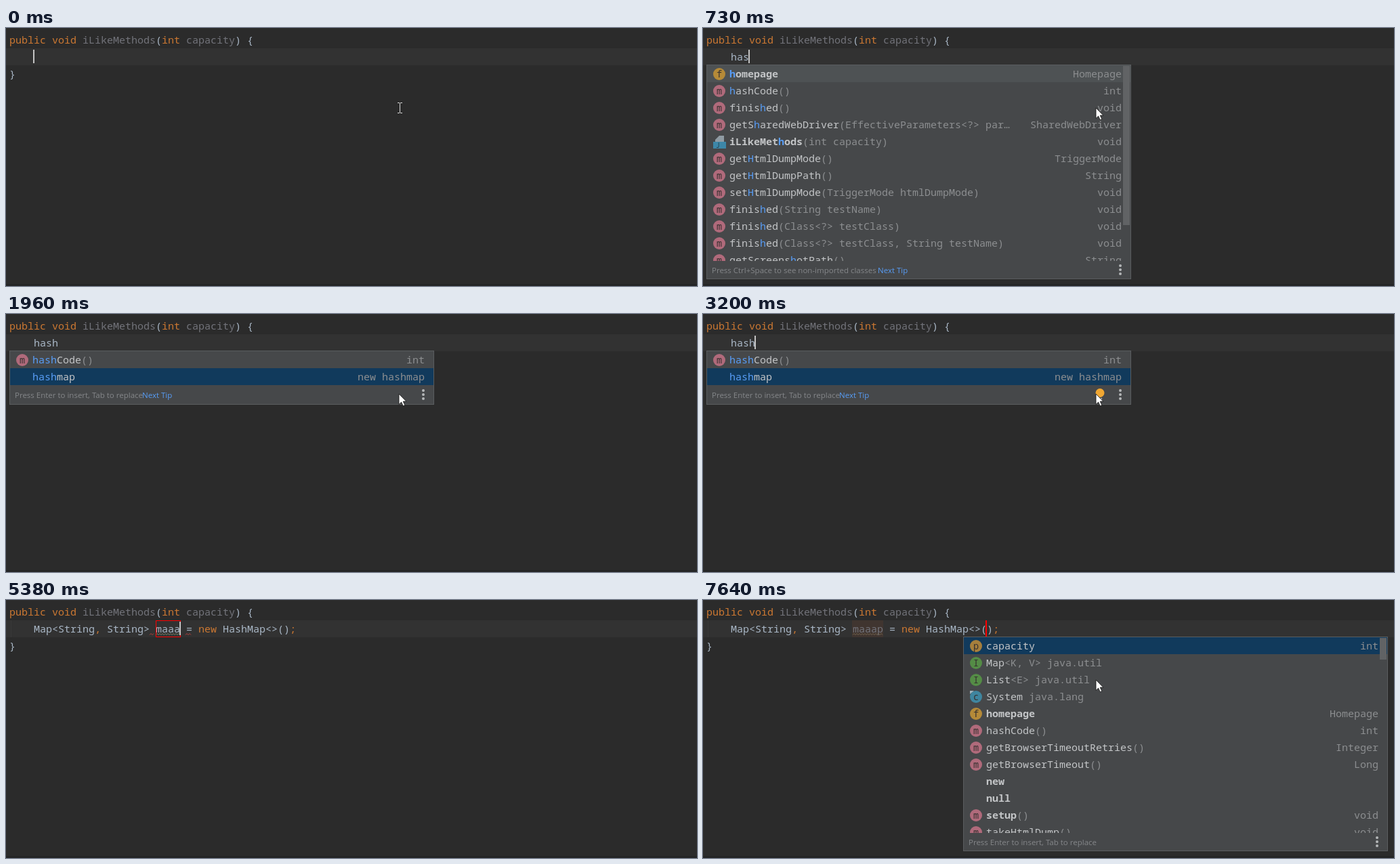
Write an HTML page that moves like this. It is 1020 px wide and 381 px high and loops after 8 s.

```html
<!DOCTYPE html>
<html lang="en">
<head>
<meta charset="utf-8">
<title>Code completion</title>
<style>
html, body { margin: 0; width: 100%; height: 100%; overflow: hidden; background: #2b2b2b; }
svg { display: block; width: 1020px; height: 381px; }
text { font: 15px "Noto Sans Mono", monospace; fill: #a9b7c6; white-space: pre; }
.item { fill: #c3c5c7; }
.bold { font-weight: bold; }
.kw { fill: #cc7832; }
.unused { fill: #72737a; }
.dim { fill: #8c8e90; }
.hit { fill: #589df6; }
.hint { font: 11.5px "Open Sans", "Noto Sans", sans-serif; fill: #85878a; }
.link { fill: #589df6; }
.end { text-anchor: end; }
.mid { text-anchor: middle; }
</style>
</head>
<body>
<svg id="stage" viewBox="0 0 1020 381">
  <defs>
    <clipPath id="list"><rect width="1020" height="344"/></clipPath>
  </defs>
  <g id="scene"></g>
</svg>
<script>
const LOOP = 8000, CELL = 9, LEFT = 41, RED = '#f00';
const scene = document.getElementById('scene');

const esc = s => s.replace(/&/g, '&amp;').replace(/</g, '&lt;');
const span = (s, cls) => s && `<tspan class="${cls}">${esc(s)}</tspan>`;
const text = (x, y, body, cls = '') => `<text x="${x}" y="${y}" class="${cls}">${body}</text>`;
const rect = (x, y, w, h, fill) => `<rect x="${x}" y="${y}" width="${w}" height="${h}" fill="${fill}"/>`;
const frame = (x, y, w, h, stroke) =>
  `<rect x="${x + .5}" y="${y + .5}" width="${w - 1}" height="${h - 1}" fill="none" stroke="${stroke}"/>`;
const line = (d, stroke, width = 1) => `<path d="${d}" fill="none" stroke="${stroke}" stroke-width="${width}"/>`;
const dot = (x, y, r, fill) => `<circle cx="${x}" cy="${y}" r="${r}" fill="${fill}"/>`;
const countPast = (times, t) => times.filter(at => t >= at).length;
const within = (t, from, to) => t >= from && t < to;

// Row: icon | name with _matched_ letters (leading ! = bold) | dim tail | right column
const longRows = [
  'f|!_h_omepage||Homepage',
  'm|_h_ashCode|()|int',
  'm|finis_h_ed|()|void',
  'm|getS_h_aredWebDriver|(EffectiveParameters<?> par…|SharedWebDriver',
  'J|!iLikeMet_h_ods|(int capacity)|void',
  'm|get_H_tmlDumpMode|()|TriggerMode',
  'm|get_H_tmlDumpPath|()|String',
  'm|set_H_tmlDumpMode|(TriggerMode htmlDumpMode)|void',
  'm|finis_h_ed|(String testName)|void',
  'm|finis_h_ed|(Class<?> testClass)|void',
  'm|finis_h_ed|(Class<?> testClass, String testName)|void',
  'm|getScreens_h_otPath|()|String'
];
const shortRows = typed => [
  `m|_${typed}_${'hashCode'.slice(typed.length)}|()|int`,
  `|_${typed}_${'hashmap'.slice(typed.length)}||new hashmap`
];
const argRows = [
  'p|capacity||int',
  'I|Map|<K, V> java.util|',
  'I|List|<E> java.util|',
  'c|System| java.lang|',
  'f|!homepage||Homepage',
  'm|hashCode|()|int',
  'm|getBrowserTimeoutRetries|()|Integer',
  'm|getBrowserTimeout|()|Long',
  '|!new||',
  '|!null||',
  '|!setup|()|void'.replace('|', 'm|'),
  'm|takeHtmlDump|()|void'
];
const iconFill = { f: '#b58a38', p: '#a67f3c', m: '#b06a7b', I: '#548c46', c: '#3f86a0' };

function icon(kind, x, y) {
  if (!kind) return '';
  if (kind === 'J') {
    return `<path d="M${x - 6} ${y}v-3l6-6h7v9z" fill="#8f9ba3"/>` + rect(x - 9, y, 19, 10, '#3d87a8') +
      text(x - 5, y + 8.5, '<tspan font-size="10" fill="#24404d">J</tspan>');
  }
  const extra = kind === 'c' ? `<path d="M${x - 9} ${y - 4}v-5h6z" fill="#9fb3bd"/>` : '';
  return dot(x, y, 9, iconFill[kind]) + extra +
    text(x, y + 4.5, `<tspan font-size="13.5" fill="#35302f">${kind}</tspan>`, 'mid');
}

function row(spec, i, x) {
  const [kind, label, tail, right] = spec.split('|');
  const y = 68 + 25 * i, bold = label[0] === '!';
  const name = label.replace('!', '').split('_')
    .map((part, k) => span(part, k % 2 ? 'hit' : '')).join('');
  const body = `<tspan class="${bold ? 'bold' : ''}">${name}</tspan>` + span(tail, 'dim');
  return icon(kind, x + 19, y) + text(x + 34, y + 5, body, 'item') +
    text(x + 613, y + 5, esc(right), 'end dim');
}

function popup({ x, bottom, rows, pick, blue, thumb, hint, linkX }) {
  const mid = bottom - (thumb ? 14 : 15);
  let out = rect(x, 54, 627, bottom - 54, '#46484a') +
    rect(x + 1, 55 + 25 * pick, 625, 25, blue ? '#113a5c' : '#4e5254');
  if (thumb) out += rect(x + 615, 56, 10, thumb, '#616365');
  out += `<g clip-path="url(#list)">${rows.map((r, i) => row(r, i, x)).join('')}</g>`;
  out += text(x + 8, mid + 5, hint, 'hint');
  if (linkX) out += text(linkX, mid + 5, 'Next Tip', 'hint link');
  for (const dy of [-6, 0, 6]) out += dot(x + 611, mid + dy, 2, '#b4b6b8');
  return out + frame(x, 54, 627, bottom - 54, '#5a5d5f');
}

function spinner(step) {
  let out = '';
  for (let i = 0; i < 8; i++) {
    const shade = 88 + 8 * ((i + 8 - step) % 8);
    out += `<path d="M592 115v-4" stroke="rgb(${shade},${shade},${shade})" stroke-width="2" ` +
      `stroke-linecap="round" transform="rotate(${45 * i} 592 119)"/>`;
  }
  return out;
}

function wave(from, to, color) {
  let d = `M${from} 51.5`;
  for (let x = from + 2, up = true; x <= to; x += 2, up = !up) d += `L${x} ${up ? 49.5 : 51.5}`;
  return line(d, color);
}

const caret = x => rect(x - 1, 32, 2, 20, '#c4c4c4');
const arrow = () => '<path d="M580 118v15.5l3.6-3.4 2.6 5.6 2.6-1.2-2.6-5.4h4.6z" fill="#fff" stroke="#111" stroke-width=".8"/>';
const beam = () => line('M578 110.5h3m1 0h3M581.5 111v14M578 125.5h3m1 0h3', '#d8d8d8');

function typing(t) {
  const word = 'hash'.slice(0, countPast([200, 580, 730, 960], t));
  const blink = countPast([1670, 2210, 2670, 3200], t) % 2 === 0;
  let out = text(LEFT, 48, word);
  if (blink) out += caret(LEFT + CELL * word.length);
  if (t < 500) out += text(5, 73, '}');
  else if (t < 810) {
    out += popup({ x: 5, bottom: 371, rows: longRows, pick: 0, thumb: 235,
      hint: 'Press Ctrl+Space to see non-imported classes', linkX: 258 });
  } else {
    const busy = t < 1270, chosen = t >= 1960;
    out += popup({ x: 5, bottom: 134, rows: shortRows(word), pick: chosen ? 1 : 0, blue: chosen,
      hint: busy ? 'Press Ctrl+Space to see non-imported classes' : 'Press Enter to insert, Tab to replace',
      linkX: busy ? 258 : 201 });
    if (busy) out += spinner(countPast([960, 1040, 1110, 1190], t));
    if (t >= 2420) out += dot(586, 116.5, 6.5, '#f0a732') + rect(583, 124, 6, 2, '#a5a7a9');
  }
  return out;
}

function declaration(t) {
  const name = 'maaap'.slice(0, countPast([4290, 4750, 4910, 5060, 5450], t));
  const start = LEFT + 20 * CELL, stop = start + CELL * name.length;
  const parsed = t >= 5910, done = t >= 6630, call = stop + 17 * CELL;
  let out = rect(7, 30, 1, 25, '#383838');
  if (t >= 6690) out += rect(start - 1, 30, stop - start + 1, 25, '#403530');
  out += text(LEFT, 48, esc('Map<String') + span(',', 'kw') + esc(' String> ') +
    span(name, parsed ? 'unused' : '') + ' = ' + span('new', 'kw') + esc(' HashMap<>()') + span(';', 'kw'));
  out += text(5, 73, '}');
  if (t >= 5380) out += wave(start, t < 5770 ? start + 36 : stop, parsed ? '#76664f' : '#7d8a70');
  if (within(t, 3740, 5910)) out += wave(212, 218, '#bc3f3c') + wave(stop + 8, stop + 17, '#bc3f3c');
  if (done) {
    out += rect(call - 2, 30, 2, 25, RED);
    if (t < 7640) out += caret(call - 1);
  } else if (t < 4290) out += frame(68, 30, 145, 25, RED) + caret(212);
  else out += frame(start, 30, stop - start + 1, 25, RED) + caret(stop);
  if (t >= 7170) {
    out += popup({ x: 384, bottom: 371, rows: argRows, pick: 0, blue: true, thumb: 32,
      hint: 'Press Enter to insert, Tab to replace' });
  }
  return out;
}

function draw(t) {
  let out = rect(0, 0, 1020, 381, '#2b2b2b') + rect(0, 30, 1020, 25, '#323232') +
    rect(0, 378, 1020, 3, '#242526');
  out += text(5, 23, span('public void ', 'kw') + span('iLikeMethods', 'unused') + '(' +
    span('int ', 'kw') + span('capacity', 'unused') + ') {');
  out += t < 3360 ? typing(t) : declaration(t);
  if (t < 270 || within(t, 3360, 4290)) out += beam();
  if (within(t, 430, 3360) || t >= 7090) out += arrow();
  return out;
}

let shown = '';
function tick(now) {
  const next = draw(now % LOOP);
  if (next !== shown) scene.innerHTML = shown = next;
  requestAnimationFrame(tick);
}
tick(0);
</script>
</body>
</html>
```
